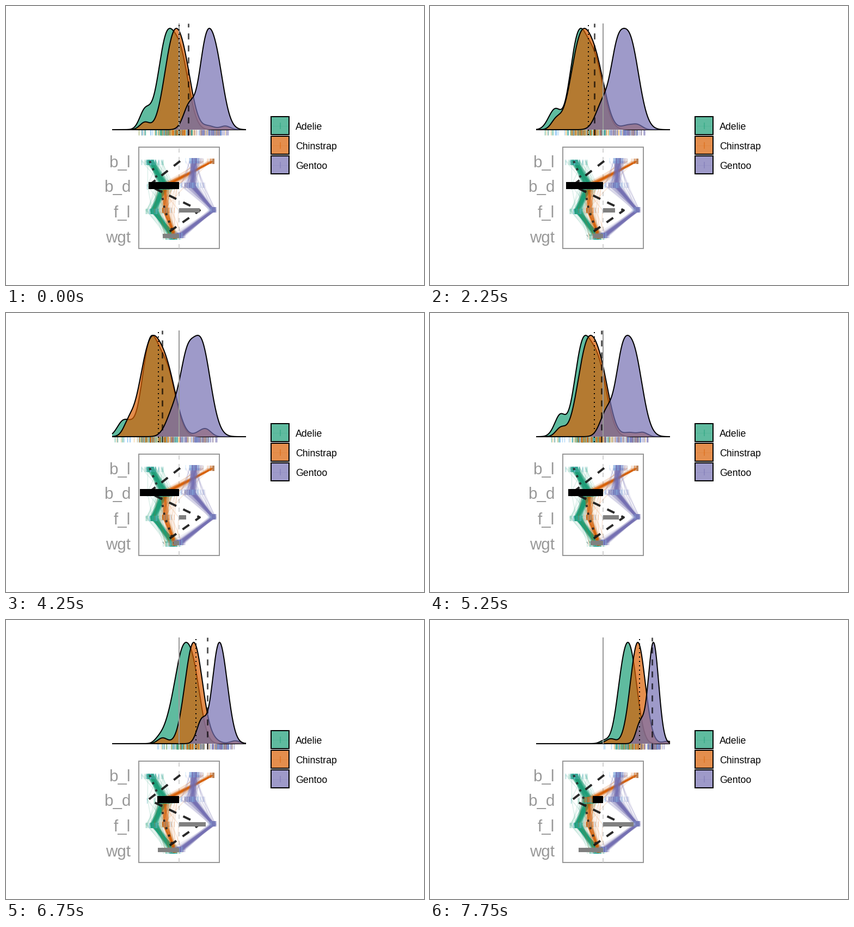
These frames come from a looping animation (768 px wide and 512 px high, 8 s). A matplotlib script:

```python
import numpy as np
import matplotlib.pyplot as plt
from matplotlib.animation import FuncAnimation
from matplotlib.collections import LineCollection
from matplotlib.patches import Rectangle, Polygon

W, H, DPI = 768, 512, 100
PX = 72 / DPI                      # points per pixel
LEFT, RIGHT, MID = 195, 441, 318   # density panel
BASE, PEAK, TOP, RUG = 227, 41, 32, 237
ORIGIN = 382                       # projected origin on the x axis
GREY = "#999999"
ROWS = [284.5, 329.5, 375, 422]    # b_l, b_d, f_l, wgt
COLORS = {"Adelie": "#1b9e77", "Chinstrap": "#d95f02", "Gentoo": "#7570b3"}

# Gaussian mixtures in the rotation plane: weight, mean a, b, var a, b, cov
MIX = {
    "Adelie": [(12, -122.5, 6, 196, 121, 50), (11, -93, 14, 289, 120, 20),
               (1.65, -173, 10, 120, 110, 0), (0.4, -150, -25, 64, 64, 0)],
    "Chinstrap": [(20, -127, 31, 400, 196, -57), (10.8, -92.5, 26, 324, 196, -57),
                  (0.6, -28, 18, 120, 120, 0), (0.5, -27, 63.5, 81, 81, 0),
                  (1, -158.6, -10.7, 81, 81, 0)],
    "Gentoo": [(17, -33.5, 38.6, 289, 47, 58), (6.4, -62, 44, 144, 90, 0),
               (3.5, -81, 25, 196, 56, -20)],
}
COUNTS = {"Adelie": 146, "Chinstrap": 68, "Gentoo": 119}

# Parallel coordinate centres and spreads per row
PROFILE = {
    "Adelie": ([266, 291, 271, 307], [4, 6, 4, 4]),
    "Chinstrap": ([380, 294, 292, 310], [6, 6, 5, 3.5]),
    "Gentoo": ([346, 341, 381, 319], [5, 6, 1.8, 4]),
}

rng = np.random.default_rng(7)
grid = np.linspace(LEFT, RIGHT, 400)


def angle(i):
    """Rotation out of the b_d axis: down to zero, then up again."""
    s = max(0, i - 5)
    deg = 40.8 - 4.5 * s if s <= 9 else 4.5 * (s - 9) - 1
    return np.radians(deg)


def density(name, c, s):
    d = np.zeros_like(grid)
    for w, a, b, va, vb, cov in MIX[name]:
        var = va * c * c + vb * s * s + 2 * cov * s * c
        mu = ORIGIN + a * c + b * s
        d += w / np.sqrt(var) * np.exp(-(grid - mu) ** 2 / (2 * var))
    return BASE - (BASE - PEAK) * d / d.max()


def sample(name):
    mix = np.array(MIX[name], float)
    picks = rng.choice(len(mix), COUNTS[name], p=mix[:, 0] / mix[:, 0].sum())
    return np.array([rng.multivariate_normal(
        (a, b), 0.65 * np.array([[va, cov], [cov, vb]]))
        for _, a, b, va, vb, cov in mix[picks]])


def ticks(x, y0, y1):
    return [[(v, y0), (v, y1)] for v in x]


fig = plt.figure(figsize=(W / DPI, H / DPI), dpi=DPI, facecolor="white")
ax = fig.add_axes([0, 0, 1, 1])
ax.set_xlim(0, W)
ax.set_ylim(H, 0)
ax.axis("off")


def line(xs, ys, px, color="black", z=1, **kw):
    kw.setdefault("solid_capstyle", "butt")
    return ax.plot(xs, ys, color=color, lw=px * PX, zorder=z,
                   dash_capstyle="butt", **kw)[0]


def box(x, y, w, h, **kw):
    return ax.add_patch(Rectangle((x, y), w, h, **kw))


# Density panel
fills, curves = {}, {}
for k, name in enumerate(COLORS):
    fills[name] = ax.add_patch(Polygon([(0, 0), (1, 0), (1, 1)], fc=COLORS[name],
                                       ec="none", alpha=0.7, zorder=3 + k))
    curves[name] = line(grid, grid * 0 + BASE, 2, z=3.5 + k)
    if k < 2:
        curves[name].set_solid_joinstyle("round")
line([MID, MID], [TOP, BASE], 2, GREY, 7)
dotted = line([MID, MID], [RUG, TOP], 2, z=8, ls=(0, (1, 3)))
dashed = line([MID, MID], [RUG, TOP], 3, z=8, ls=(0, (3.67, 3.67)), alpha=0.65)

points = np.vstack([sample(n) for n in COLORS])
tints = []
for name in COLORS:
    shades = [COLORS[name]] * 3 + ["#6fb7f2", "#f2b95c"]
    tints += list(rng.choice(shades, COUNTS[name]))
rug = LineCollection([], colors=tints, lw=1.4 * PX, alpha=0.55, zorder=2)
ax.add_collection(rug)

# Parallel coordinates
box(244, 259, 148, 186, fc="white", ec=GREY, lw=2 * PX, zorder=1)
line([MID, MID], [445, 259], 1.6, "#c8c8c8", 1.5, ls=(0, (5, 5)))
for name, (mu, sd) in PROFILE.items():
    n = COUNTS[name]
    wide = np.where(rng.random((n, 1)) < 0.22, 2.4, 0.8)
    x = mu + rng.normal(size=(n, 4)) * sd * wide
    if name == "Chinstrap":
        x[:, 0] = 382 - rng.exponential(1.5, n) * wide[:, 0] ** 2
    x = np.clip(x, 249, 386)
    ax.add_collection(LineCollection(
        [list(zip(r, ROWS)) for r in x], colors=COLORS[name],
        lw=1.8 * PX, alpha=0.13, zorder=2))
    for j, y in enumerate(ROWS):
        shade = rng.choice([COLORS[name]] * 3 + ["#8cc8f5"], n)
        off = {"Adelie": 2, "Chinstrap": 0, "Gentoo": -1}[name]
        ax.add_collection(LineCollection(
            ticks(x[:, j], y + off - 5, y + off + 5), colors=shade,
            lw=1.6 * PX, alpha=0.22, zorder=2.2))
line([320, 262, 356, 289], ROWS, 4, "#111111", 3, ls=(0, (3.7, 3.5)), alpha=0.9)
line([264, 283, 292, 309], ROWS, 4, "#222222", 3, ls=(0, (1, 2.6)), alpha=0.85)

bars = [box(MID, y - h / 2, 0, h, fc=c, ec="none", zorder=4)
        for y, h, c in ((329.5, 13, "black"), (375, 8, "#808080"),
                        (422, 8, "#808080"))]

for text, y in zip(("b_l", "b_d", "f_l", "wgt"), (295.5, 341, 388, 433.5)):
    ax.text(229, y, text, family="Liberation Sans", size=29.5 * PX, color=GREY,
            ha="right", va="baseline", zorder=1)
box(150, 260, 33, 190, fc="white", ec="none", zorder=2)  # label cut-off

# Legend
for k, (name, color) in enumerate(COLORS.items()):
    y = 203 + 36 * k
    box(487, y, 33, 33, fc=color, ec="none", alpha=0.7)
    box(487, y, 33, 33, fc="none", ec="black", lw=2 * PX, zorder=2)
    line([503.5, 503.5], [y + 11, y + 23], 1.5, color, alpha=0.55)
    line([489, 518], [y + 16.5, y + 16.5], 1, color, alpha=0.15)
    ax.text(532, y + 24, name, family="Liberation Sans", size=17.8 * PX,
            color="black", va="baseline")


def update(i):
    c, s = np.cos(angle(i)), np.sin(angle(i))
    for name in COLORS:
        y = density(name, c, s)
        curves[name].set_ydata(y)
        fills[name].set_xy([(LEFT, BASE), *zip(grid, y), (RIGHT, BASE)])
    for mark, a, b, c0 in ((dotted, -112.5, 31.7, 64.5),
                           (dashed, -109.4, 55.8, 63.3)):
        x = MID + c0 + a * c + b * s
        mark.set_xdata([x, x])
    xs = np.clip(ORIGIN + points @ (c, s), LEFT, RIGHT)
    rug.set_segments(ticks(xs, BASE, RUG))
    for bar, width in zip(bars, (-74 * c, 58 * s, -46 * s)):
        bar.set_width(width)
    return [*fills.values(), *curves.values(), dotted, dashed, rug, *bars]


anim = FuncAnimation(fig, update, frames=32, interval=250, repeat=True,
                     repeat_delay=0, blit=False)
plt.show()
```
